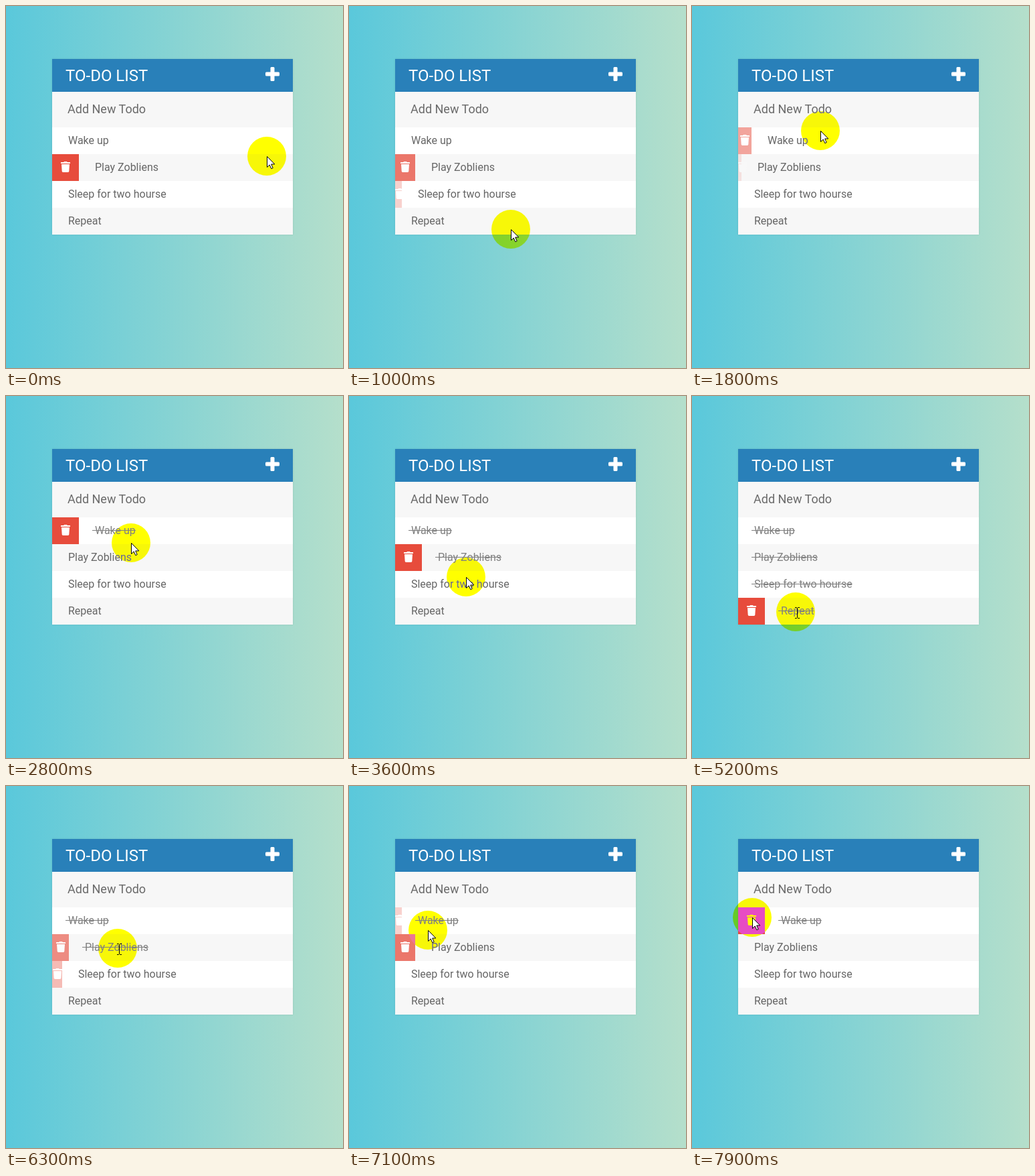
An HTML page for the animation above (8000 ms loop, 504 by 540 pixels).

```html
<!DOCTYPE html>
<html lang="en">
<head>
<meta charset="utf-8">
<title>To-do list</title>
<style>
  html, body { margin: 0; width: 100%; height: 100%; overflow: hidden; }
  #stage {
    position: relative; width: 504px; height: 540px; overflow: hidden; isolation: isolate;
    background: linear-gradient(to right, #5ac8db, #b5dfcb);
    font: 16px Roboto, sans-serif; color: #666;
  }
  #card {
    position: absolute; left: 69px; top: 79px; width: 360px; height: 262px;
    background: #f7f7f7; box-shadow: 0 0 3px rgba(0, 0, 0, .1);
  }
  h1 {
    margin: 0; padding-left: 20px; height: 49px;
    font-size: 24px; font-weight: 400; line-height: 51px; color: #fff; background: #2980b9;
  }
  #plus { position: absolute; left: 319px; top: 12px; fill: #fff; }
  #entry { padding-left: 23px; height: 53px; font-size: 18px; line-height: 51px; color: #6a6a6a; }
  ul { margin: 0; padding: 0; list-style: none; }
  li { position: relative; display: flex; height: 40px; line-height: 40px; background: #fff; }
  li:nth-child(2n) { background: #f7f7f7; }
  .bin { position: relative; flex: none; height: 40px; background: #e74c3c; }
  .bin svg { position: absolute; top: 11px; fill: #fff; }
  .label { margin-left: 20px; white-space: pre; }
  .done { color: gray; text-decoration: line-through; }
  /* Difference with pure blue turns white into yellow */
  #spot {
    position: absolute; left: -29px; top: -29px; width: 58px; height: 58px;
    border-radius: 50%; background: #00f; mix-blend-mode: difference;
  }
  #pointer { position: absolute; left: 0; top: 0; overflow: visible; }
</style>
</head>
<body>
<div id="stage">
  <div id="card">
    <h1>TO-DO LIST</h1>
    <svg id="plus" width="21" height="21">
      <rect y="7.5" width="21" height="6" rx="1.5"/>
      <rect x="7.5" width="6" height="21" rx="1.5"/>
    </svg>
    <div id="entry">Add New Todo</div>
    <ul id="list"></ul>
  </div>
  <div id="spot"></div>
  <svg id="pointer" width="20" height="20">
    <path id="arrow" fill="#fff" stroke="#000" d="M.5 .5V16.5L4.2 13L6.8 18.7L9.2 17.6L6.7 12H11.8Z"/>
    <path id="beam" fill="none" stroke="#000" d="M-1 -6.5H1.5L2.5 -5.5L3.5 -6.5H6M2.5 -5.5V8.5M-1 9.5H1.5L2.5 8.5L3.5 9.5H6"/>
  </svg>
</div>
<script>
const LOOP = 8000, FRAME = 100, TICK = 25;
const OPEN = 40, SLIDE = OPEN * TICK / 200;
const LIST_TOP = 181, ROW = 40, LEFT = 69;
const todos = ['Wake up', 'Play Zobliens', 'Sleep for two hourse', 'Repeat'];

// Stops of the pointer: time, x, y
const path = [
  [400, 390, 224], [950, 270, 262], [1000, 242, 333], [1350, 243, 322], [1700, 200, 220],
  [1800, 192, 186], [2400, 193, 198], [3580, 174, 259], [3600, 175, 270], [4500, 170, 282],
  [4850, 159, 335], [5200, 155, 322], [6165, 166, 261], [6300, 167, 242], [6800, 162, 241],
  [7300, 88, 197], [7600, 133, 215], [7800, 83, 196], [7900, 90, 196]
];
// Each click strikes out or restores the row under the pointer
const clicks = [2400, 3300, 4100, 5000, 5400, 6000, 6600];

const $ = id => document.getElementById(id);
const clamp = (value, low, high) => Math.max(low, Math.min(high, value));

const rows = todos.map(text => {
  const item = document.createElement('li');
  item.innerHTML = `<span class="bin"><svg width="14" height="16">
    <path d="M.5 1H4.2L4.6 .4Q4.8 0 5.2 0H8.8Q9.2 0 9.4 .4L9.8 1H13.5Q14 1 14 1.5V2.5Q14 3 13.5 3H.5Q0 3 0 2.5V1.5Q0 1 .5 1Z
      M1 4H13L12.3 14.6Q12.2 16 10.8 16H3.2Q1.8 16 1.7 14.6Z"/>
    </svg></span><span class="label"> ${text}</span>`;
  $('list').append(item);
  const [bin, icon, label] = ['.bin', 'svg', '.label'].map(part => item.querySelector(part));
  return { bin, icon, label };
});

function pointerAt(t) {
  const next = clamp(path.findIndex(stop => stop[0] > t), 1, path.length - 1);
  if (t >= path[path.length - 1][0]) return path[path.length - 1].slice(1);
  const [t0, x0, y0] = path[next - 1], [t1, x1, y1] = path[next];
  const k = clamp((t - t0) / (t1 - t0), 0, 1);
  return [x0 + (x1 - x0) * k, y0 + (y1 - y0) * k];
}

const rowAt = t => Math.floor((pointerAt(t)[1] - LIST_TOP) / ROW);

// Bins slide open under the pointer and shut elsewhere
function binWidths(time) {
  const widths = todos.map((_, i) => i === rowAt(0) ? OPEN : 0);
  for (let t = 0; t < time; t += TICK) {
    const hovered = rowAt(t);
    widths.forEach((width, i) => {
      widths[i] = clamp(width + (i === hovered ? SLIDE : -SLIDE), 0, OPEN);
    });
  }
  return widths;
}

function draw(t) {
  const [x, y] = pointerAt(t);
  const widths = binWidths(t);
  let overText = false;
  rows.forEach(({ bin, icon, label }, i) => {
    const width = widths[i];
    bin.style.width = width + 'px';
    bin.style.opacity = width / OPEN;
    icon.style.left = Math.max(0, (width - 14) / 2) + 'px';
    const hits = clicks.filter(time => time <= t && rowAt(time) === i);
    label.classList.toggle('done', hits.length % 2 === 1);
    const start = LEFT + width + 20;
    const middle = LIST_TOP + ROW * (i + 0.5);
    if (Math.abs(y - middle) < 10 && x >= start && x <= start + label.offsetWidth) overText = true;
  });
  const move = `translate(${Math.round(x)}px, ${Math.round(y)}px)`;
  $('spot').style.transform = $('pointer').style.transform = move;
  $('arrow').style.display = overText ? 'none' : '';
  $('beam').style.display = overText ? '' : 'none';
}

const begin = performance.now();
function tick() {
  const t = (performance.now() - begin) % LOOP;
  draw(Math.floor(t / FRAME) * FRAME);
  requestAnimationFrame(tick);
}
tick();
</script>
</body>
</html>
```
